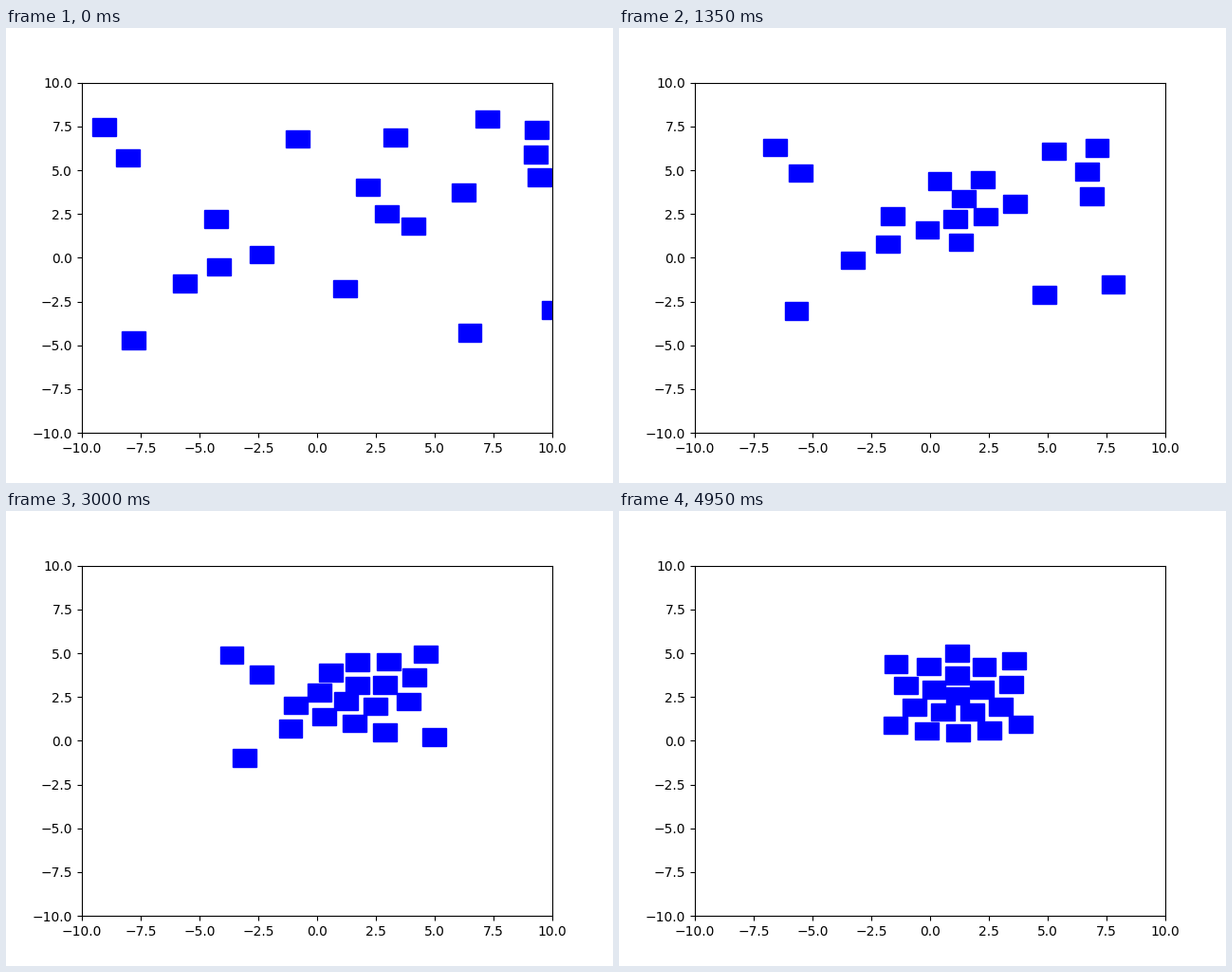
These frames come from a looping animation (640x480 px, 5000 ms). A matplotlib script:

```python
import numpy as np
import matplotlib.pyplot as plt
from matplotlib.animation import FuncAnimation
from matplotlib.patches import Rectangle

STEPS = 100
INTERVAL = 50
SIZE = 1.0

SPEED = 0.1      # pull toward the middle of the flock, per step
REACH = 1.45     # boxes closer than this push each other apart
PUSH = 0.5       # push per unit of overlap, per step
SUBSTEPS = 5     # small substeps keep the packed flock from jittering

START = np.array([
    (-9.05, 7.46), (-8.05, 5.70), (-0.83, 6.79), (3.33, 6.87), (7.24, 7.92),
    (9.33, 7.30), (9.29, 5.89), (9.46, 4.59), (6.23, 3.73), (2.16, 4.03),
    (2.96, 2.51), (4.09, 1.81), (-4.29, 2.21), (-4.17, -0.52), (-2.36, 0.18),
    (-5.63, -1.47), (-7.80, -4.71), (1.19, -1.76), (6.49, -4.28), (10.06, -2.98),
])


def pull(pos):
    """Constant speed toward the flock's centre, easing only on arrival."""
    to_centre = pos.mean(axis=0) - pos
    dist = np.linalg.norm(to_centre, axis=1, keepdims=True)
    return SPEED * to_centre / np.maximum(dist, SPEED)


def push(pos):
    """Separation from every neighbour within reach."""
    apart = pos[:, None] - pos[None, :]
    dist = np.linalg.norm(apart, axis=2, keepdims=True)
    overlap = np.maximum(REACH - dist, 0)
    return PUSH * (overlap * apart / np.maximum(dist, 1e-9)).sum(axis=1)


def simulate():
    pos = START.copy()
    path = [pos]
    for _ in range(STEPS - 1):
        for _ in range(SUBSTEPS):
            pos = pos + (pull(pos) + push(pos)) / SUBSTEPS
        path.append(pos)
    return np.array(path)


fig, ax = plt.subplots(figsize=(6.4, 4.8), dpi=100)
ax.set_xlim(-10, 10)
ax.set_ylim(-10, 10)

corners = simulate() - SIZE / 2
boxes = [ax.add_patch(Rectangle(xy, SIZE, SIZE, color="blue"))
         for xy in corners[0]]


def update(i):
    for box, xy in zip(boxes, corners[i]):
        box.set_xy(xy)
    return boxes


anim = FuncAnimation(fig, update, frames=STEPS, interval=INTERVAL,
                     repeat=True, repeat_delay=0)
plt.show()
```
